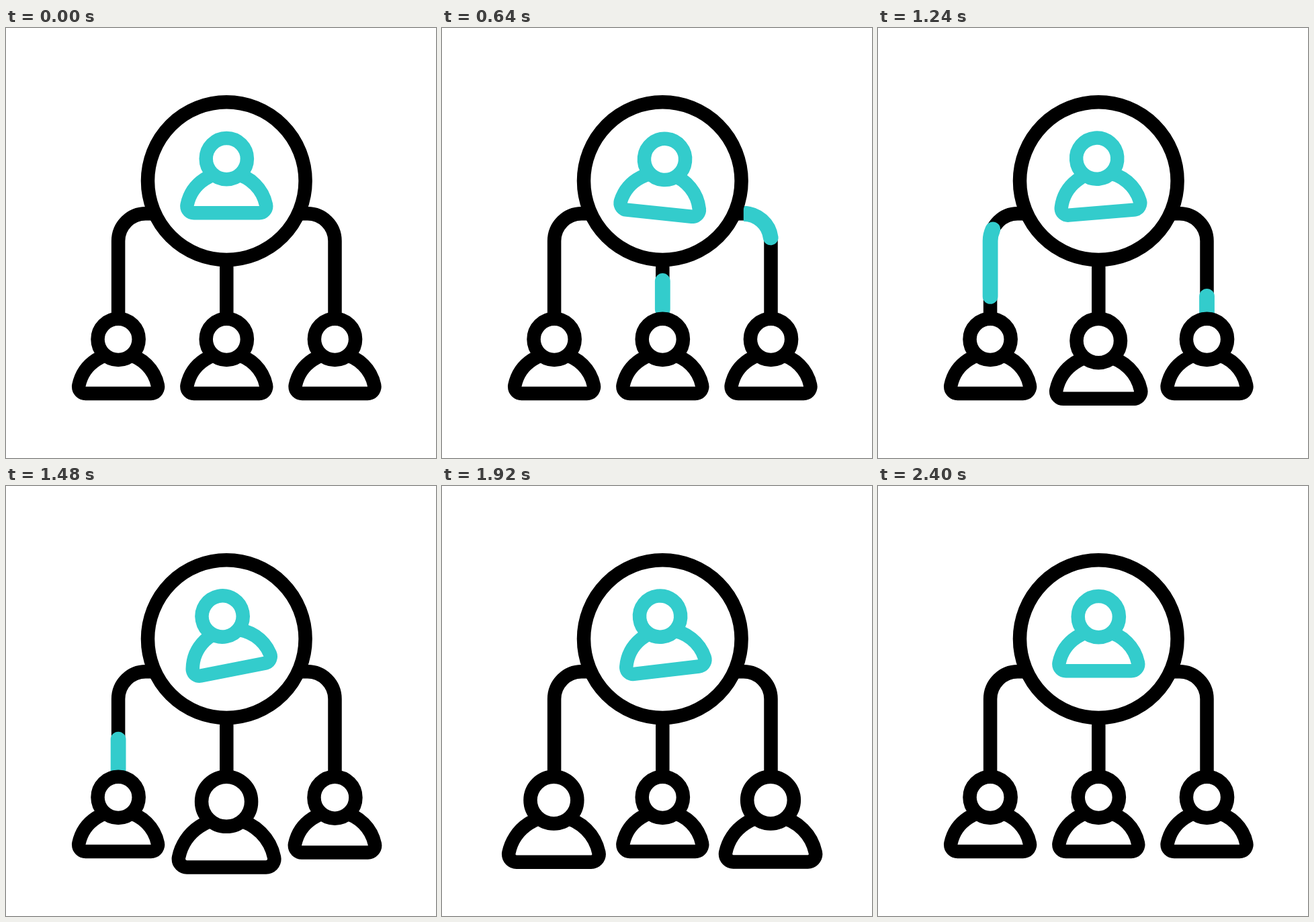
Animation of 640 by 640 pixels, one loop 2.42 s. Source, as an HTML page with a canvas:

```html
<!DOCTYPE html>
<html lang="en">
<head>
<meta charset="utf-8">
<style>
  html, body { margin: 0; width: 100%; height: 100%; overflow: hidden; background: #fff; }
  canvas { display: block; }
</style>
</head>
<body>
<canvas id="stage" width="640" height="640"></canvas>
<script>
const ctx = document.getElementById('stage').getContext('2d');
const LOOP = 2420, BEAT = 320;
const BLACK = '#000', TEAL = '#33cccc';
const LINE = 20.5, PULSE = 22.8;
const CX = 328.3, RING_Y = 227.6;
const HEAD_R = 30.6, HEAD_TOP = 432.7;

// Each branch: side of the hub, beat on which it begins, pop size, pop anchor offset
const branches = [
  { side: 0, beat: 0, grow: 0.22, anchor: 1 },
  { side: 1, beat: 1, grow: 0.28, anchor: 3.5 },
  { side: -1, beat: 2, grow: 0.28, anchor: 5 }
];

const clamp = v => Math.min(1, Math.max(0, v));
const ease = (t, from, to) => {
  const p = clamp((t - from) / (to - from));
  return p * p * (3 - 2 * p);
};

function strokeWith(color, width = LINE) {
  ctx.strokeStyle = color;
  ctx.lineWidth = width;
  ctx.stroke();
}

// Outline of a person, origin at the top of the head; line weight ignores scale
function drawPerson(color, s = 1) {
  const headY = HEAD_R * s, base = 111.3 * s;
  const corner = 10.2 * s, cornerX = 48.7 * s, tilt = Math.atan2(10.2, 48.7);
  const shoulder = Math.hypot(cornerX, corner) + corner;
  ctx.beginPath();
  ctx.arc(-cornerX, base - corner, corner, Math.PI / 2, Math.PI + tilt);
  ctx.arc(0, base, shoulder, Math.PI + tilt, 2 * Math.PI - tilt);
  ctx.arc(cornerX, base - corner, corner, -tilt, Math.PI / 2);
  ctx.closePath();
  ctx.fillStyle = '#fff';
  ctx.fill();
  strokeWith(color);
  ctx.beginPath();
  ctx.arc(0, headY, HEAD_R * s, 0, 2 * Math.PI);
  ctx.fill();
  strokeWith(color);
}

function traceLink(side, startX, startY, endY) {
  const x = CX + side * 161.2;
  ctx.beginPath();
  if (side) {
    ctx.moveTo(CX + side * startX, 276.3);
    ctx.arcTo(x, 276.3, x, 317, 40.7);
  } else {
    ctx.moveTo(x, startY);
  }
  ctx.lineTo(x, endY);
}

function drawLink({ side, beat }, t) {
  traceLink(side, 112, 345, 430);
  ctx.lineCap = 'butt';
  strokeWith(BLACK);

  const start = beat * BEAT;
  const length = side ? 178.2 : 77.7;
  const head = ease(t, start, start + 800) * length;
  const tail = ease(t, start + BEAT, start + BEAT + 800) * length;
  if (head - tail < 0.05) return;
  traceLink(side, 124.9, 349, 426.7);
  ctx.lineCap = 'round';
  ctx.setLineDash([head - tail, 1000]);
  ctx.lineDashOffset = -tail;
  strokeWith(TEAL, PULSE);
  ctx.setLineDash([]);
}

function drawMember({ side, beat, grow, anchor }, t) {
  const start = 1120 + beat * BEAT, peak = start + BEAT;
  const pop = grow * (ease(t, start, peak) - ease(t, peak, peak + BEAT));
  ctx.save();
  ctx.translate(CX + side * 161.2 - anchor * pop, HEAD_TOP);
  drawPerson(BLACK, 1 + pop);
  ctx.restore();
}

function drawHub(t) {
  ctx.beginPath();
  ctx.arc(CX, RING_Y, 117.3, 0, 2 * Math.PI);
  ctx.fillStyle = '#fff';
  ctx.fill();
  strokeWith(BLACK);

  const angle = 6.6 * ease(t, 0, 800) - 18.3 * ease(t, 800, 1560) + 11.7 * ease(t, 1560, 2360);
  ctx.save();
  ctx.translate(322, 226);
  ctx.rotate(angle * Math.PI / 180);
  ctx.translate(CX - 322, 164 - 226);
  drawPerson(TEAL);
  ctx.restore();
}

function draw(t) {
  ctx.fillStyle = '#fff';
  ctx.fillRect(0, 0, 640, 640);
  branches.forEach(b => drawLink(b, t));
  drawHub(t);
  branches.forEach(b => drawMember(b, t));
}

const begin = performance.now();
function tick() {
  draw((performance.now() - begin) % LOOP);
  requestAnimationFrame(tick);
}
tick();
</script>
</body>
</html>
```
